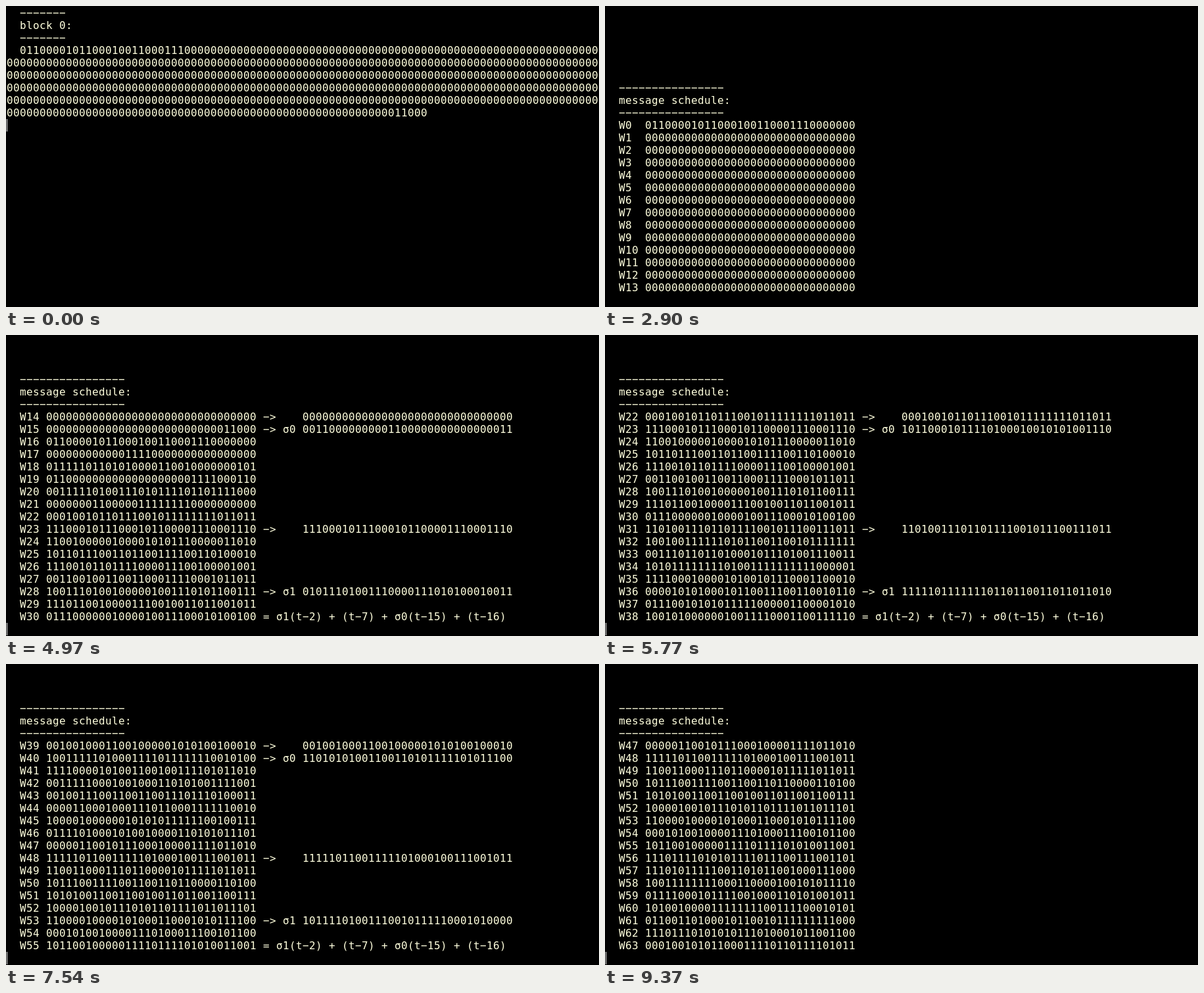
An HTML page with a canvas that plays this animation: 902 by 458 pixels, repeating every 9.88 s.

```html
<!DOCTYPE html>
<html lang="en">
<head>
<meta charset="utf-8">
<title>Message schedule</title>
<style>
  html, body { margin: 0; width: 100%; height: 100%; overflow: hidden; background: #000; }
  canvas { display: block; }
</style>
</head>
<body>
<canvas id="term" width="902" height="458"></canvas>
<script>
const LOOP = 9880, ROWS = 24, CELL_W = 10, CELL_H = 19, PAD = 1;
const HEADER_AT = 770, ARROWS_OFF = 8870;
const BLINK = 600, BLINK_SHIFT = 230;

// Words are printed at a steady pace; one due just after a blink shows with it
function printTime(n) {
  const due = n < 16 ? 1600 + 100 * n : 3520 + 102.4 * (n - 16);
  const sinceBlink = (due + BLINK_SHIFT) % BLINK;
  return sinceBlink <= 30 ? due - sinceBlink : due;
}

// SHA-256 message schedule for "abc"
const rotr = (x, n) => (x >>> n) | (x << (32 - n));
const sigma0 = x => (rotr(x, 7) ^ rotr(x, 18) ^ (x >>> 3)) >>> 0;
const sigma1 = x => (rotr(x, 17) ^ rotr(x, 19) ^ (x >>> 10)) >>> 0;
const bin = x => x.toString(2).padStart(32, "0");

const W = new Array(16).fill(0);
W[0] = 0x61626380;
W[15] = 24;
for (let t = 16; t < 64; t++) {
  W[t] = (sigma1(W[t - 2]) + W[t - 7] + sigma0(W[t - 15]) + W[t - 16]) >>> 0;
}
const message = W.slice(0, 16).map(bin).join("");

function title(text) {
  const rule = "  " + "-".repeat(text.length - 1);
  return [rule, "  " + text, rule];
}

function note(i, n) {
  switch (n - i) {
    case 16:
    case 7: return " ->    " + bin(W[i]);
    case 15: return " -> σ0 " + bin(sigma0(W[i]));
    case 2: return " -> σ1 " + bin(sigma1(W[i]));
    case 0: return " = σ1(t-2) + (t-7) + σ0(t-15) + (t-16)";
  }
  return "";
}

// Screen lines after word n is printed (n = -1: none yet)
function screen(n, header, arrows) {
  const bits = message.slice((n + 1) * 32);
  const lines = title("block 0:").concat(("  " + bits).match(/.{1,90}/g));
  if (!header) return lines;
  while (lines.length < 10) lines.push("");
  lines.push(...title("message schedule:"));
  for (let i = Math.max(0, n - 16); i <= n; i++) {
    const label = ("W" + i).padEnd(4);
    lines.push("  " + label + bin(W[i]) + (arrows ? note(i, n) : ""));
  }
  return lines;
}

const ctx = document.getElementById("term").getContext("2d", { alpha: false });

function draw(lines, cursor) {
  ctx.fillStyle = "#000";
  ctx.fillRect(0, 0, 902, 458);
  ctx.font = '16px "DejaVu Sans Mono", monospace';
  ctx.fillStyle = "#ffffdd";
  const scroll = Math.max(0, lines.length - ROWS + 1);
  lines.slice(scroll).forEach((line, row) => {
    // the terminal's hyphen is as wide as a minus sign
    [...line.replace(/-/g, "\u2212")].forEach((ch, col) => {
      if (ch !== " ") ctx.fillText(ch, PAD + col * CELL_W, PAD + row * CELL_H + 15);
    });
  });
  if (cursor) {
    ctx.fillStyle = "#fff";
    ctx.fillRect(PAD, PAD + (lines.length - scroll) * CELL_H, 1, CELL_H);
  }
}

let shown = "";
function tick() {
  const t = performance.now() % LOOP;
  let n = -1;
  while (n < 63 && printTime(n + 1) <= t) n++;
  const header = t >= HEADER_AT;
  const arrows = n >= 16 && t < ARROWS_OFF;
  const cursor = Math.floor((t + BLINK_SHIFT) / BLINK) % 2 === 0;
  const state = [n, header, arrows, cursor].join();
  if (state !== shown) {
    shown = state;
    draw(screen(n, header, arrows), cursor);
  }
  requestAnimationFrame(tick);
}
tick();
</script>
</body>
</html>
```
